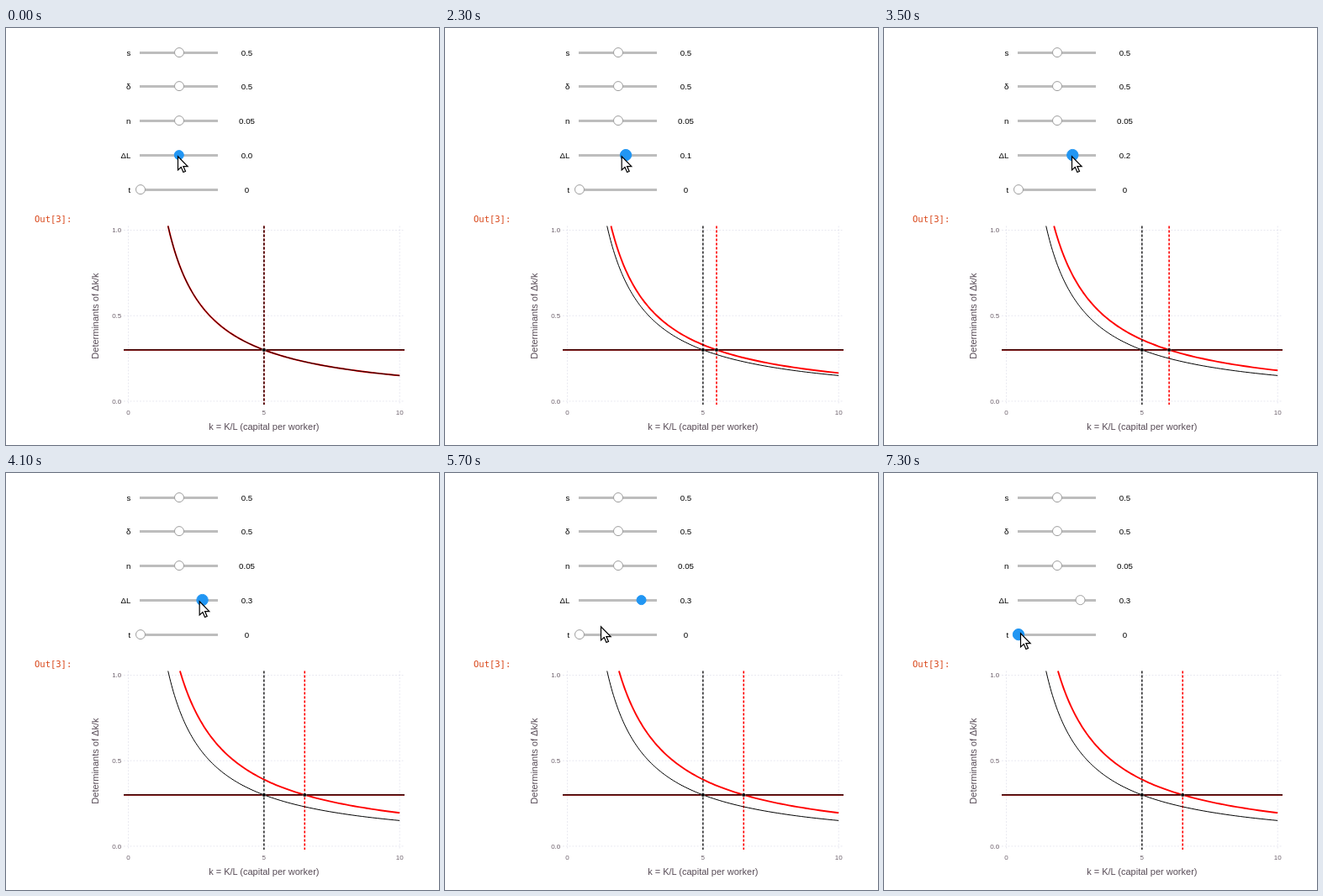
An HTML page for the animation above (8000 ms loop, 515 by 496 pixels).

```html
<!DOCTYPE html>
<html lang="en">
<head>
<meta charset="utf-8">
<title>Growth sliders</title>
<style>
  html, body { margin: 0; width: 100%; height: 100%; overflow: hidden; background: #fff; }
  svg { display: block; font-family: "Liberation Sans", Arial, sans-serif; }
  .ui { font-size: 9.7px; fill: #000; }
  .tick { font-size: 8px; fill: #6c606b; }
  .title { font-size: 11px; fill: #564a55; text-anchor: middle; }
  .prompt { font: 10.5px "DejaVu Sans Mono", monospace; fill: #d84315; }
  .track { stroke: #bdbdbd; stroke-width: 3; }
  .knob { fill: #fff; stroke: #9e9e9e; }
  .knob.on { fill: #2196f3; stroke: #2196f3; }
  .grid { stroke: #d0d0e0; stroke-width: .75; stroke-dasharray: 1.9; opacity: .65; }
  .plot { fill: none; }
  .red { stroke: #f00; stroke-width: 1.9; }
  .black { stroke: #000; stroke-width: 1; }
  .dash { stroke-dasharray: 3 2; }
  .dash.red { stroke-width: 1.6; }
  .dash.black { stroke-width: 1.3; }
  .dot { fill: #000; stroke: #fff; stroke-width: .4; }
  .mid { text-anchor: middle; }
  .end { text-anchor: end; }
</style>
</head>
<body>
<svg id="stage" width="515" height="496" viewBox="0 0 515 496"></svg>
<script>
const stage = document.getElementById("stage");
const LOOP = 8000, STEP = 100;
const TOP = 235.5, BOTTOM = 448, LEFT = 140, RIGHT = 474;
const px = k => 145.5 + 32.27 * k;
const py = v => 443.9 - 203.4 * v;

function add(tag, attrs, text) {
  const el = document.createElementNS("http://www.w3.org/2000/svg", tag);
  for (const name in attrs) el.setAttribute(name, attrs[name]);
  if (text !== undefined) el.textContent = text;
  return stage.appendChild(el);
}
const line = (cls, x1, y1, x2, y2) => add("line", { class: cls, x1, y1, x2, y2 });
const label = (cls, x, y, text) => add("text", { class: cls, x, y }, text);

// Hyperbola c/k from the top edge of the plot to k = 10
function curve(c) {
  const first = c * 203.4 / (443.9 - TOP), n = 90;
  let d = "";
  for (let i = 0; i <= n; i++) {
    const k = first * Math.pow(10 / first, i / n);
    d += (i ? "L" : "M") + px(k).toFixed(2) + " " + py(c / k).toFixed(2);
  }
  return d;
}

// Sliders, on whole pixel rows
const rows = [["s", "0.5"], ["δ", "0.5"], ["n", "0.05"], ["ΔL", "0.0"], ["t", "0"]];
const sliders = rows.map(([name, value], i) => {
  const y = Math.floor(29 + 40.8 * i) + .5;
  label("ui end", 148.3, y + 3.5, name);
  line("track", 159, y, 252, y);
  return {
    knob: add("circle", { class: "knob", cx: i < 4 ? 206 : 160, cy: y - .4, r: 5.5 }),
    value: label("ui mid", 286.5, y + 3.5, value)
  };
});
label("prompt", 34, 231, "Out[3]:");

// Axes
for (const k of [0, 5, 10]) {
  line("grid", px(k), TOP, px(k), BOTTOM);
  label("tick mid", px(k), 460, k);
}
for (const v of [0, .5, 1]) {
  line("grid", LEFT, py(v), RIGHT, py(v));
  label("tick end", 137.3, py(v) + 2.9, v.toFixed(1));
}
label("title", 306.8, 478, "k = K/L (capital per worker)");
add("text", { class: "title", transform: "translate(110 342.6) rotate(-90)" }, "Determinants of Δk/k");

// Plot
const redCurve = add("path", { class: "plot red" });
const redDash = line("dash red", 0, TOP, 0, BOTTOM);
line("red", LEFT, py(.3), RIGHT, py(.3));
add("path", { class: "plot black", d: curve(1.5) });
line("dash black", px(5), TOP, px(5), BOTTOM);
const level = line("black", LEFT, py(.3), RIGHT, py(.3));
level.style.strokeWidth = 1.3;
const redDot = add("circle", { class: "dot", cy: py(.3), r: 2.2 });
add("circle", { class: "dot", cx: px(5), cy: py(.3), r: 2.2 });

const cursor = add("path", {
  d: "M0 0V16.2L3.8 12.8L6.4 18.7L9 17.6L6.4 11.8H11.6Z",
  fill: "#fff", stroke: "#000", "stroke-width": 1.2
});

// Pointer path: time, x, y
const path = [
  [0, 204, 152], [1500, 204, 152], [1600, 205, 152], [1800, 208, 152], [2100, 208, 152],
  [2400, 210.5, 152], [2500, 210.5, 152], [2800, 214, 152], [3000, 218.5, 152],
  [3100, 218.5, 152], [3500, 223, 152], [3700, 223, 152], [4300, 233, 152],
  [4900, 233, 152], [5700, 185, 182], [5800, 181, 183], [6300, 160, 190],
  [7200, 160, 190], [7300, 162, 190], [LOOP, 162, 190]
];
// The button is released before the pointer leaves the knob
path[13][0] = 5000;

function pointer(t) {
  const i = path.findIndex(p => p[0] > t);
  const [t0, x0, y0] = path[i - 1], [t1, x1, y1] = path[i];
  const f = (t - t0) / (t1 - t0);
  return [x0 + (x1 - x0) * f, y0 + (y1 - y0) * f];
}

function setKnob(knob, on, held) {
  knob.setAttribute("class", on ? "knob on" : "knob");
  knob.setAttribute("r", held ? 6.7 : 5.5);
}

let last = -1;
function draw(now) {
  const t = Math.floor(now % LOOP / STEP) * STEP;
  if (t !== last) {
    last = t;
    const shift = (t >= 2300) + (t >= 3300) + (t >= 4100);
    const [x, y] = pointer(t);
    cursor.setAttribute("transform", `translate(${x + .5} ${y + .8})`);

    const [, , , labour, time] = sliders;
    labour.knob.setAttribute("cx", 205.8 + 9.25 * shift);
    labour.value.textContent = (shift / 10).toFixed(1);
    setKnob(labour.knob, t < 7100, t >= 500 && t < 5000);
    setKnob(time.knob, t >= 6200, t >= 7100);

    const k = px(5 + shift / 2);
    redCurve.setAttribute("d", curve(1.5 + .15 * shift));
    redDash.setAttribute("x1", k);
    redDash.setAttribute("x2", k);
    redDot.setAttribute("cx", k);
  }
  requestAnimationFrame(() => draw(performance.now() - start));
}
const start = performance.now();
draw(0);
</script>
</body>
</html>
```
